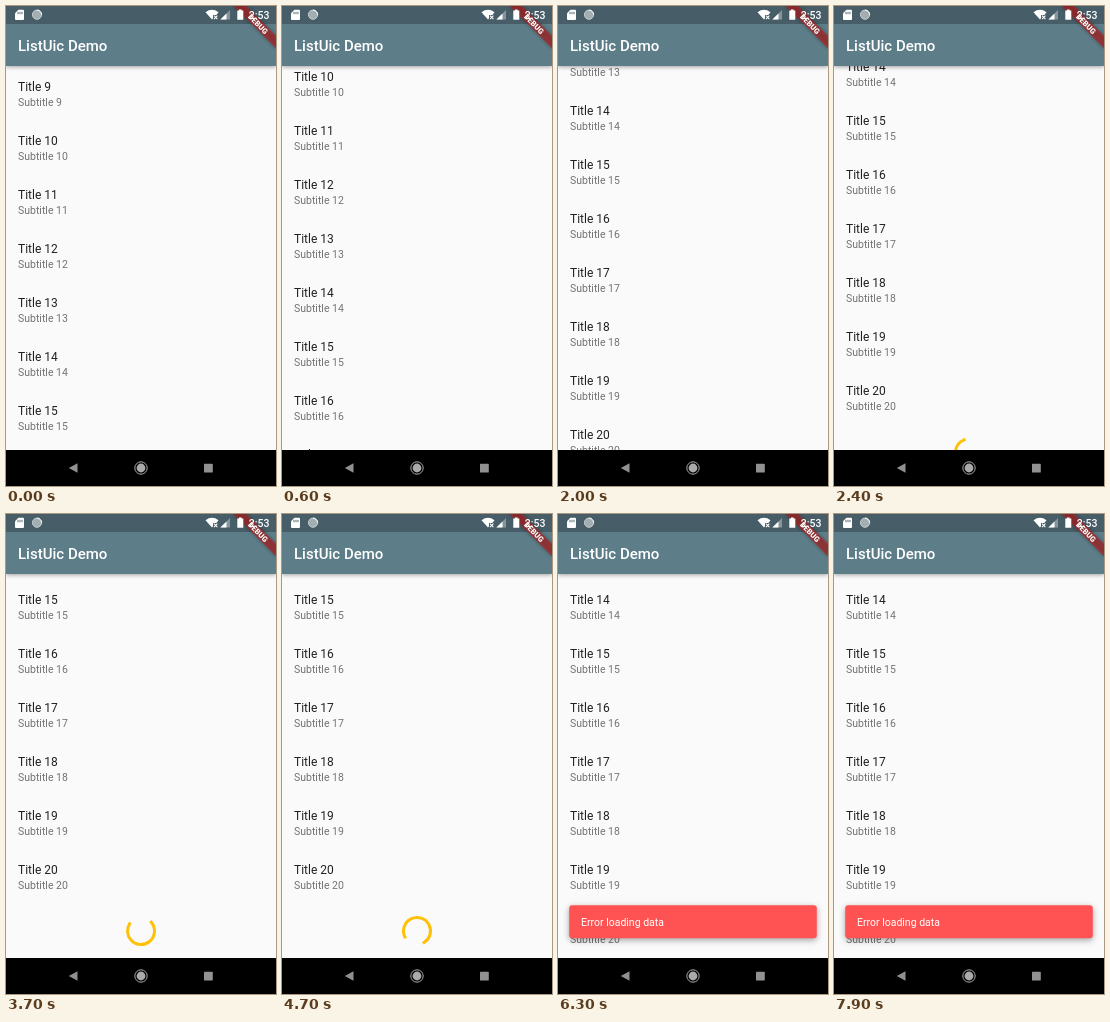
Recreate the animation shown at these times as an HTML page. Size 270 by 480 pixels, loop 8 s.

```html
<!DOCTYPE html>
<html lang="en">
<head>
<meta charset="utf-8">
<title>List demo</title>
<style>
  html, body { margin: 0; width: 100%; height: 100%; overflow: hidden; background: #fafafa; }
  svg { display: block; width: 270px; height: 480px; font-family: Roboto, "Liberation Sans", sans-serif; }
  .title { font-size: 12px; fill: rgba(0, 0, 0, .87); }
  .sub { font-size: 10.5px; fill: rgba(0, 0, 0, .54); }
  #bar { filter: drop-shadow(0 1.5px 2px rgba(0, 0, 0, .36)); }
  #snack { filter: drop-shadow(0 2px 3px rgba(0, 0, 0, .35)); }
  #ribbon { filter: drop-shadow(0 0 2px rgba(0, 0, 0, .5)); }
</style>
</head>
<body>
<svg viewBox="0 0 270 480">
  <rect width="270" height="480" fill="#fafafa"/>
  <g id="list">
    <circle id="spinner" cx="135" cy="736" r="13.5" pathLength="360" fill="none"
      stroke="#ffc107" stroke-width="3" stroke-linecap="square"/>
  </g>

  <g id="snack">
    <rect x="11.2" y="391.3" width="247.6" height="33" rx="3" fill="#ff5252"/>
    <text id="message" x="23" y="411.7" font-size="10.5" fill="#fff">Error loading data</text>
  </g>

  <g id="bar">
    <rect width="270" height="60" fill="#5d7e89"/>
    <rect width="270" height="18" fill="#475d67"/>
  </g>
  <text x="12" y="45.2" font-size="15" font-weight="500" fill="#fff">ListUic Demo</text>

  <g transform="translate(270) rotate(45)">
    <rect id="ribbon" x="-30" y="21" width="60" height="9" fill="#b71c1c" fill-opacity=".63"/>
    <text y="28.2" font-size="7.65" font-weight="900" fill="#fff" text-anchor="middle">DEBUG</text>
  </g>

  <!-- status icons -->
  <g fill="#fff">
    <path d="M12.4 3.8H17a1 1 0 0 1 1 1V13a1 1 0 0 1-1 1H10a1 1 0 0 1-1-1V7.2Z"/>
    <path d="M12 5.8v2.4M14 5.8v2.4M16 5.8v2.4" stroke="#475d67" stroke-width=".9"/>
    <circle cx="31" cy="8.7" r="4.6" fill="#a3aeb3" stroke="#c5cdd0"/>
    <path d="M31 4.1a4.6 4.6 0 0 1 4.6 4.6" fill="none" stroke="#fff"/>
    <path d="M199.500 6.200Q206 1.400 212.500 6.200L210.300 9H207V12.200L206 13.600Z"/>
    <path d="M208 9.700l3.400 3.400m0-3.400l-3.400 3.400" stroke="#fff" stroke-width="1.100"/>
    <path d="M224 4V13.600H214.400Z" fill-opacity=".35"/>
    <path d="M220.500 7.500V13.600H214.400Z"/>
    <path d="M233 3.500h2.600v1.100h1.700V13.800h-6V4.600h1.700Z"/>
    <text x="242.800" y="12.800" font-size="10.500" font-weight="500">2:53</text>
  </g>

  <!-- navigation buttons -->
  <rect y="444" width="270" height="36"/>
  <g fill="#919191">
    <path d="M71.500 457.300V466.700L62.800 462Z"/>
    <circle cx="135" cy="462" r="4.400" fill="#aaa"/>
    <circle cx="135" cy="462" r="6.200" fill="none" stroke="#aaa"/>
    <rect x="198" y="457.700" width="8.800" height="8.800" rx=".6"/>
  </g>
</svg>
<script>
const LOOP = 8000, STEP = 100;
const LOAD_START = 2075, LOAD_END = 5125, SPIN = 1032;
const LIST_END = 265, LOADER_END = 319;
const $ = id => document.getElementById(id);
const clamp = x => Math.min(1, Math.max(0, x));

function addText(cls, y, text) {
  const el = document.createElementNS("http://www.w3.org/2000/svg", "text");
  el.setAttribute("class", cls);
  el.setAttribute("x", 12);
  el.setAttribute("y", y);
  el.textContent = text;
  $("list").append(el);
}
for (let n = 9; n <= 20; n++) {
  const top = 61 + 54 * (n - 9);
  addText("title", top + 24, "Title " + n);
  addText("sub", top + 39, "Subtitle " + n);
}

// cubic-bezier(.4, 0, .2, 1)
function curve(x) {
  if (x <= 0 || x >= 1) return clamp(x);
  let lo = 0, hi = 1, s;
  for (let i = 0; i < 20; i++) {
    s = (lo + hi) / 2;
    const r = 1 - s;
    if (1.2 * s * r * r + .6 * s * s * r + s ** 3 < x) lo = s; else hi = s;
  }
  return s * s * (3 - 2 * s);
}

const fling = (t, start, length, power) => 1 - (1 - clamp((t - start) / length)) ** power;

function scrollAt(t) {
  if (t < 500) return t < 100 ? 0 : t < 300 ? 3 : 4;
  if (t < 2000) return 4 + 241.3 * fling(t, 450, 850, 1.47);
  if (t < LOAD_END) return 245.3 + (LOADER_END - 245.3) * fling(t, 1990, 800, 1.28);
  // overdamped spring back to the shorter list
  const s = (t - LOAD_END) / 1000;
  const rest = 1.7 * Math.exp(-9.08 * s) - .7 * Math.exp(-22.03 * s);
  return LIST_END + (LOADER_END - LIST_END) * rest;
}

function drawSpinner(t) {
  const on = t >= LOAD_START && t < LOAD_END;
  $("spinner").style.display = on ? "" : "none";
  if (!on) return;
  const turns = (t - LOAD_START) / SPIN, step = Math.floor(turns), p = turns - step;
  const head = 270 * curve(2 * p), tail = 270 * curve(2 * p - 1);
  const start = -90 + tail + 306 * p - 144 * step;
  $("spinner").setAttribute("stroke-dasharray", `${Math.max(head - tail, .1)} 360`);
  $("spinner").setAttribute("transform", `rotate(${start} 135 736)`);
}

function draw(now) {
  const t = Math.floor(now % LOOP / STEP) * STEP;
  $("list").setAttribute("transform", `translate(0 ${-scrollAt(t)})`);
  drawSpinner(t);
  const fade = curve((t - 5352) / 137);
  $("snack").style.opacity = fade;
  $("message").style.opacity = fade ** 3;
}

let begin;
function tick(now) {
  begin ??= now;
  draw(now - begin);
  requestAnimationFrame(tick);
}
draw(0);
requestAnimationFrame(tick);
</script>
</body>
</html>
```
